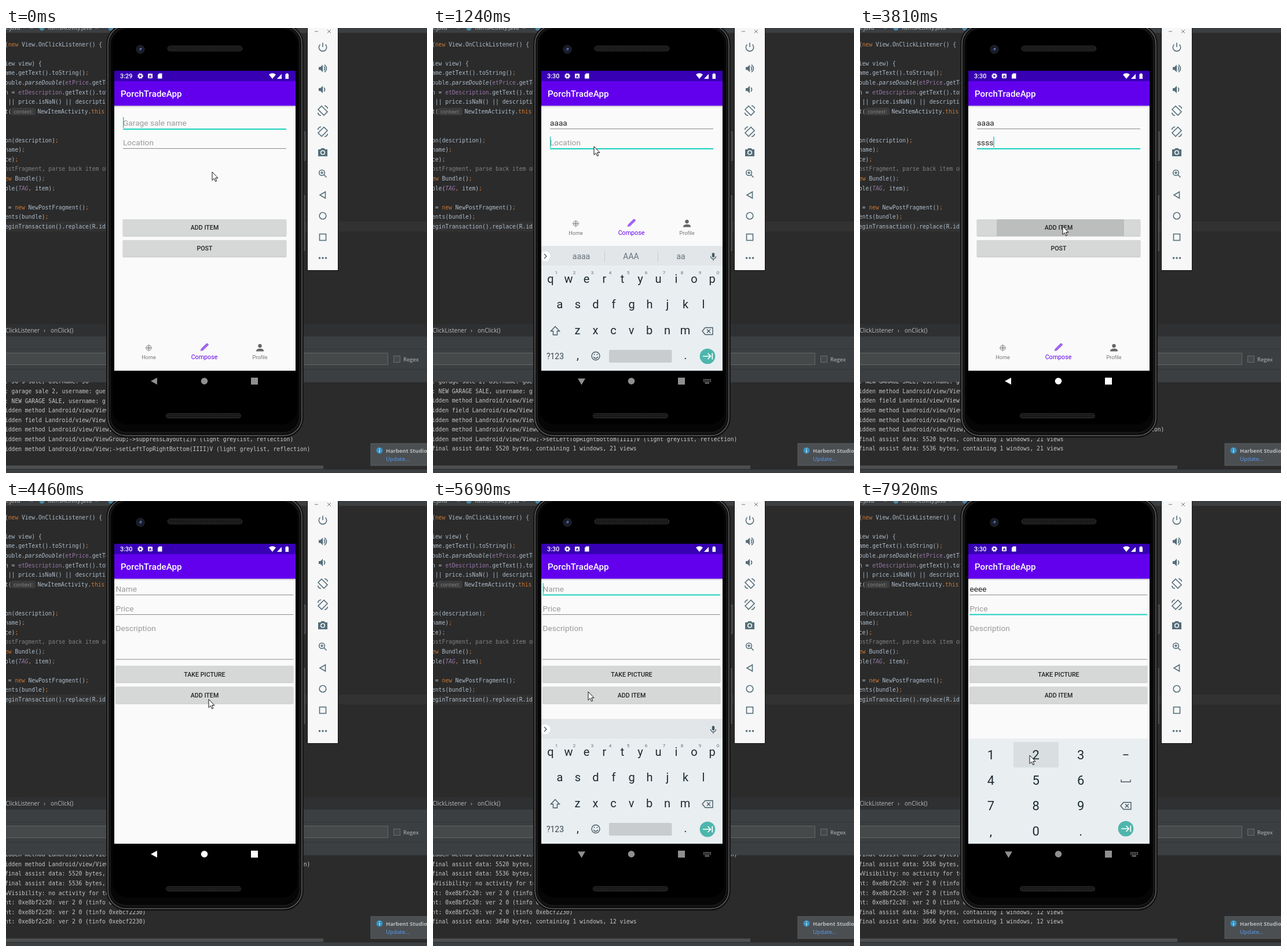
Write an HTML page that moves like this. It is 727x770 px and loops after 8000 ms.

```html
<!DOCTYPE html>
<html lang="en">
<head>
<meta charset="utf-8">
<title>Emulator demo</title>
<style>
html, body { margin: 0; width: 100%; height: 100%; overflow: hidden; background: #2b2b2b }
svg { display: block; width: 727px; height: 770px }
text { white-space: pre; font-family: Roboto, sans-serif }
.code text { font: 9.65px "DejaVu Sans Mono", monospace; fill: #adbbc9 }
.code .log { fill: #c6c6c6 }
.code .kw { fill: #cc7832 }
.code .field { fill: #9876aa }
.code .it { font-style: italic }
.code .note { fill: #808080 }
.ide text { font: 10px "Open Sans", sans-serif; fill: #bbb }
.tools { fill: none; stroke: #546e7a; stroke-width: 1.6 }
.solid { fill: #546e7a; stroke: none }
.in { font-size: 13.7px; fill: #222 }
.hint { font-size: 13.7px; fill: #999 }
.btn { font-size: 10.7px; font-weight: 500; fill: #222 }
.tab { font-size: 9.1px; fill: #757575 }
.mid { text-anchor: middle }
.key { font-size: 20px; fill: #1d2b31; text-anchor: middle }
.tip { font-size: 8px; fill: #5f6c72; text-anchor: middle }
.sug { font-size: 14px; fill: #66737a; text-anchor: middle }
.line { fill: none; stroke: #455a64; stroke-width: 1.4 }
.rule { stroke: #8a8a8a }
.teal { stroke: #1cd0c0; stroke-width: 2 }
</style>
</head>
<body>
<svg viewBox="0 0 727 770">
<defs>
  <clipPath id="logClip"><rect y="612" width="727" height="124"/></clipPath>
  <clipPath id="appClip"><rect x="187" y="74" width="313" height="519"/></clipPath>
  <clipPath id="imeClip"><rect x="187" y="74" width="313" height="556"/></clipPath>
  <linearGradient id="shade" x2="0" y2="1">
    <stop stop-opacity=".2"/><stop offset="1" stop-opacity="0"/>
  </linearGradient>
  <pattern id="mesh" width="3" height="3" patternUnits="userSpaceOnUse">
    <rect width="3" height="3" fill="#0d0d0d"/><circle cx="1.5" cy="1.5" r=".9" fill="#3a3a3a"/>
  </pattern>
</defs>

<!-- IDE -->
<g class="ide">
  <rect width="727" height="770" fill="#2b2b2b"/>
  <rect width="727" height="9" fill="#3c3f41"/>
  <rect y="8" width="727" height="1" fill="#323232"/>
  <text x="-12" y="3">ent.java</text><text x="41" y="3" fill="#888">×</text>
  <circle cx="62" cy="0" r="4.5" fill="#4a88a8"/><text x="72" y="3" style="font-size:9.5px">ItemsActivity.java</text>
  <text x="154" y="3">×</text><circle cx="181" cy="0" r="4.5" fill="#4a88a8"/>
  <rect y="335" width="727" height="17" fill="#323232"/>
  <rect y="513" width="727" height="20" fill="#2e3032"/>
  <text x="-7" y="527">nClickListener</text><text x="65" y="527">›</text><text x="77" y="527">onClick()</text>
  <rect y="533" width="727" height="80" fill="#3c3f41"/>
  <path d="M0 533.5H727M0 555.5H727M0 590.5H727" stroke="#323232"/>
  <rect x="-2" y="562.5" width="661.5" height="20" fill="#45494a" stroke="#646464"/>
  <rect x="669.5" y="567.5" width="11" height="11" fill="#43494a" stroke="#6b6b6b"/>
  <text x="686" y="577" style="font-size:9.6px">Regex</text>
  <rect y="613" width="727" height="144" fill="#2b2b2b"/>
  <rect y="757" width="548" height="6" fill="#4d4e4f"/>
  <rect y="764" width="727" height="6" fill="#3c3f41"/>
</g>
<g class="code" id="code">
  <rect x="9" y="138" width="42" height="13" rx="3" fill="#3b3b3b"/>
  <text x="13" y="147.5" style="font:9px 'Open Sans',sans-serif;fill:#888">context:</text>
</g>
<g class="code" clip-path="url(#logClip)"><g id="log"></g></g>
<g class="ide">
  <rect x="630" y="719" width="99" height="38" fill="#4b4f52" stroke="#5c6062"/>
  <circle cx="645" cy="731" r="5.5" fill="#3592c4"/>
  <path d="M645 730V734.5M645 727V728.6" stroke="#ddd" stroke-width="1.5"/>
  <text x="656" y="735" style="font-weight:700;font-size:9.4px">Harbent Studio</text>
  <text x="656" y="748.5" style="fill:#589df6;font-size:9.7px">Update...</text>
</g>

<!-- Emulator tools -->
<rect x="520.5" y="-2" width="53" height="421.5" fill="#f7f7f7" stroke="#111"/>
<g class="tools">
  <path d="M533 6H539M555 3L561 9M561 3L555 9" stroke="#777" stroke-width="1"/>
  <path d="M542.5 28.5A6.7 6.7 0 1 0 551.5 28.5M547 25.5V33"/>
  <g id="speaker">
    <path class="solid" d="M540 67.5H543L547 63.5V76.5L543 72.5H540Z"/>
    <path d="M549 66.5Q552 70 549 73.5"/>
  </g>
  <path d="M550 63.5Q557 70 550 76.5"/>
  <use href="#speaker" y="36.5"/>
  <g id="rotate">
    <path d="M545 135L555 145L549 151L539 141ZM550 134.5Q554.5 135 555.5 139.500M544 151.5Q539.500 151 538.500 146.500"/>
  </g>
  <use href="#rotate" transform="matrix(-1 0 0 1 1094 36.5)"/>
  <path class="solid" d="M539 210H543L544.5 208H549.5L551 210H555V222H539Z"/>
  <circle cx="547" cy="215.5" r="3.3" stroke="#f7f7f7"/>
  <circle cx="545.5" cy="250.5" r="4.8"/><path d="M549 254L553.5 258.5M543 250.5H548M545.5 248V253"/>
  <path d="M551.5 283.5V294.5L542 289Z"/><circle cx="547" cy="325" r="5.8"/>
  <rect x="541.5" y="356.5" width="11" height="11"/>
  <g class="solid"><circle cx="541.5" cy="398" r="1.8"/><circle cx="547" cy="398" r="1.8"/><circle cx="552.5" cy="398" r="1.8"/></g>
</g>

<!-- Phone -->
<path d="M511 180H517V229H511ZM511 290H516V385H511Z" fill="#3a3a3a" stroke="#777" stroke-width=".7"/>
<rect x="173.5" y="-6.500" width="340" height="715" rx="34" fill="#0c0c0c" stroke="#1a1a1a"/>
<rect x="176" y="-4" width="335" height="709.500" rx="31.500" fill="#101010" stroke="#626262" stroke-width="1.500"/>
<rect x="180" y="0" width="327" height="700" rx="28" fill="#060606" stroke="#262626"/>
<rect x="184" y="2" width="319" height="684" rx="26" fill="#000"/>
<rect x="279" y="31" width="129" height="9" rx="4.5" fill="url(#mesh)" stroke="#2a2a2a"/>
<rect x="276.5" y="667" width="129" height="8" rx="4" fill="url(#mesh)" stroke="#2a2a2a"/>
<circle cx="232" cy="37" r="7" fill="#161a24" stroke="#2c3038"/><circle cx="232" cy="37" r="2.6" fill="#33427a"/>
<circle cx="233" cy="35.5" r="1" fill="#a9b6e0"/>

<g clip-path="url(#appClip)">
  <rect x="187" y="74" width="313" height="519" fill="#fafafa"/>
  <!-- Sale form -->
  <text class="hint" x="202" y="168.5" data-on="0-560">Garage sale name</text>
  <text class="hint" x="202" y="203" data-on="0-1650">Location</text>
  <text class="in" x="202" y="168.5" data-type="a 560 700 840 980"></text>
  <text class="in" x="202" y="203" data-type="s 1650 1790 1920 2060"></text>
  <path class="rule" d="M202 174.5H484M202 208.5H484"/>
  <path class="teal" d="M202 175H484" data-on="0-1240"/>
  <path class="teal" d="M202 209H484" data-on="1240-8000"/>
  <g data-on="0-430 2860-5000">
    <g data-box="202 331 282"></g><g data-box="202 367 282"></g>
    <rect id="ripple" x="236" y="331" width="220" height="29" fill="#bcbdbd" data-on="3810-4330"/>
    <text class="btn mid" x="343" y="349">ADD ITEM</text><text class="btn mid" x="343" y="385">POST</text>
  </g>
  <g id="tabs">
    <circle cx="246.5" cy="553.5" r="4.3" fill="none" stroke="#9a9a9a" stroke-width="1.3"/>
    <circle cx="246.5" cy="553.5" r="2.3" fill="#9a9a9a"/>
    <path d="M246.5 547.5V559.5M240.5 553.5H252.5" stroke="#9a9a9a"/>
    <path d="M335.5 559L336.8 555L346 545.8Q347.5 544.8 349 546.2T349.3 549.2L340 558.2Z" fill="#a066f0"/>
    <circle cx="438.5" cy="550" r="3.2" fill="#666"/><path d="M432 559.5V558Q433 555 438.5 554.8T445 558V559.5Z" fill="#666"/>
    <text class="tab mid" x="246.5" y="573">Home</text>
    <text class="mid" x="342.5" y="573" font-size="10.7" fill="#6200ee">Compose</text>
    <text class="tab mid" x="438.5" y="573">Profile</text>
  </g>

  <!-- Item form -->
  <g id="itemForm">
    <rect x="187" y="120" width="313" height="500" fill="#fafafa"/>
    <text class="hint" x="189.5" y="156.5" data-on="4070-6050">Name</text>
    <text class="in" x="189.5" y="156.5" data-type="e 6050 6440 6690 6980"></text>
    <text class="hint" x="189.5" y="190.5">Price</text><text class="hint" x="189.5" y="224.5">Description</text>
    <path class="rule" d="M189 162.5H496M189 196.5H496M189 274H496"/>
    <path class="teal" d="M189 162.5H496" data-on="5130-7530"/>
    <path class="teal" d="M189 196.5H496" data-on="7530-8000"/>
    <g data-box="189 285 307"></g><g data-box="189 321.5 307"></g>
    <text class="btn mid" x="343" y="303.5">TAKE PICTURE</text><text class="btn mid" x="343" y="340">ADD ITEM</text>
  </g>
  <rect id="under" height="1" width="0" fill="#222"/>
  <rect id="caret" width="1.3" height="19" fill="#1cbfb0" data-on="0-3130 3530-4070 5130-7920"/>

  <rect x="187" y="134" width="313" height="4" fill="url(#shade)"/>
  <rect x="187" y="92" width="313" height="42.5" fill="#6200ee"/>
  <rect x="187" y="74" width="313" height="18" fill="#3700b3"/>
  <text x="198" y="119" font-size="15.2" font-weight="500" fill="#fff">PorchTradeApp</text>
  <g fill="#fff">
    <g font-size="10.9" font-weight="500"><text x="197" y="87" data-on="0-560">3:29</text><text x="197" y="87" data-on="560-8000">3:30</text></g>
    <circle cx="232" cy="83" r="2.8" fill="none" stroke="#fff" stroke-width="2"/>
    <circle cx="232" cy="83" r="4.2" fill="none" stroke="#fff" stroke-width="1.4" stroke-dasharray="1.9 1.4"/>
    <rect x="245" y="79" width="8" height="8" rx="1"/><text class="mid" x="249" y="86" font-size="7.5" font-weight="700" fill="#3700b3">A</text>
    <path d="M262 81L264.5 78.5H269.5V87.5H262Z"/>
    <path d="M454 80.5Q460 76 466 80.5L460 88ZM468 88L476 79.5V88ZM482.5 79.5H484V78.5H486.5V79.5H488V88H482.5Z"/>
  </g>
</g>

<!-- Keyboards -->
<g clip-path="url(#imeClip)">
  <g id="ime" data-on="290-2860 5260-7660">
    <rect x="187" y="377" width="313" height="216" fill="#e9eef1"/>
    <rect x="187" y="377" width="313" height="34" fill="#e2e6e9"/>
    <circle cx="194" cy="395" r="8.5" fill="#fff"/><path class="line" d="M192 391L196 395L192 399"/>
    <rect x="481.8" y="389" width="4.4" height="8" rx="2.2" fill="#455a64"/>
    <path class="line" d="M479.5 395Q480 399.5 484 399.5T488.5 395M484 399.5V402.5"/>
    <g id="keys"></g>
    <path class="line" d="M211 516.5L203.5 524.5H207.5V531H214.5V524.5H218.5Z"/>
    <path id="del" class="line" d="M465 524.5L470 518.5H483V530.5H470ZM473 521.5L479 527.5M479 521.5L473 527.5"/>
    <text class="mid" x="211" y="573" font-size="14" fill="#37474f">?123</text>
    <text class="key" x="250" y="573">,</text><text class="key" x="436" y="573">.</text>
    <circle class="line" cx="281" cy="567.5" r="7"/><path class="line" d="M277 569Q281 574 285 569M278.5 564V566M283.5 564V566"/>
    <rect x="304" y="557" width="108.5" height="22" rx="2" fill="#c8cccf"/>
    <circle cx="474" cy="568" r="13.3" fill="#4db6ac"/>
    <circle cx="474" cy="568" r="13.3" fill="#3a948b" data-on="7410-7530"/>
    <path id="next" d="M466 568H479M474.5 563L479.5 568L474.5 573M482.3 562.5V573.5" fill="none" stroke="#fff" stroke-width="1.7"/>
  </g>
  <g id="pad" data-on="7660-8000">
    <rect x="187" y="411" width="313" height="182" fill="#e9eef1"/>
    <rect x="265" y="417" width="78" height="44" fill="#d9dee0" data-on="7920-8000"/>
    <path class="line" d="M451 482V486H467V482"/><use href="#del" x="-15" y="3"/>
    <circle cx="459" cy="567" r="13.3" fill="#4db6ac"/><use href="#next" x="-15" y="-1"/>
  </g>
</g>

<!-- System navigation -->
<rect x="224" y="594" width="64" height="36" rx="18" fill="#2c2c2c" data-on="2460-2860"/>
<g id="sysNav">
  <path d="M250 611L261 605V617Z" data-on="0-290 2860-5400"/>
  <path d="M250 606.5H263L256.5 617.5Z" data-on="290-2860 5400-8000"/>
  <circle cx="342.5" cy="611" r="5.8"/><rect x="423" y="605" width="12" height="12"/>
  <g data-on="290-2860 5400-8000" fill="none" stroke="#8a8a8a" stroke-width="1.8">
    <path d="M467 608.5H480M467 611.3H480" stroke-dasharray="1.7 1.1"/><path d="M469.5 614.3H477"/>
  </g>
</g>
<g id="mouse"><path d="M0 0V14.5L3.3 11.4L5.6 16.6L7.8 15.7L5.6 10.6H10Z" fill="#fff" stroke="#111" stroke-linejoin="round"/></g>
</svg>

<script>
const LOOP = 8000, STEP = 16.6;
const $ = id => document.getElementById(id);
const all = (sel, fn) => document.querySelectorAll(sel).forEach(fn);
const text = (cls, x, y, s, attrs = '') => `<text class="${cls}" x="${x}" y="${y}" ${attrs}>${s}</text>`;
const add = (id, html) => $(id).insertAdjacentHTML('beforeend', html);

// Editor: [row, code], rows counted from the first visible line
const paint = s => s
  .replace(/[;,]|\b(new|ew|this)\b/g, '<tspan class="kw">$&</tspan>')
  .replace(/etPrice|etDescription/g, '<tspan class="field">$&</tspan>')
  .replace(/TAG/, '<tspan class="field it">$&</tspan>')
  .replace(/parseDouble/, '<tspan class="it">$&</tspan>');
[[0, '(new View.OnClickListener() {'], [2, 'iew view) {'], [3, 'ame.getText().toString();'],
 [4, 'ouble.parseDouble(etPrice.getTe'], [5, 'n = etDescription.getText().toS'],
 [6, ' || price.isNaN() || descripti'], [7, 't('], [10, 'on(description);'], [11, 'name);'], [12, 'ce);'],
 [14, 'ew Bundle();'], [15, 'ble(TAG, item);'], [17, ' = new NewPostFragment();'],
 [18, 'ents(bundle);'], [19, 'eginTransaction().replace(R.id.']
].forEach(([row, s]) => add('code', text('', -2, 31.6 + row * STEP, paint(s))));
add('code', text('', 54.5, 31.6 + 7 * STEP, paint('NewItemActivity.this')));
add('code', text('note', -2, 31.6 + 13 * STEP, 'ostFragment, parse back item ob'));

// Log
const hidden = (kind, s) => `idden ${kind} Landroid/view/View${s} (light greylist, reflection)`;
const assist = (bytes, views) => `final assist data: ${bytes} bytes, containing 1 windows, ${views} views`;
const tinfo = 'nt: 0xe8bf2c20: ver 2 0 (tinfo 0xebcf2230)';
[': Jo\'s sale, username: Jo', ': garage sale 2, username: gue', ': NEW GARAGE SALE, username: g',
 hidden('method', ';->getInset()V'), hidden('field', ';->mInfo:I'), hidden('method', ';->fitAll()Z'),
 hidden('method', 'Group;->suppressLayout(Z)V'), hidden('method', ';->setLeftTopRightBottom(IIII)V'),
 assist(5520, 21), assist(5536, 21), 'wVisibility: no activity for token', tinfo, tinfo, tinfo,
 assist(3640, 12), assist(3656, 12)
].forEach((s, i) => add('log', text('log', -2, 615.3 + i * STEP, s)));

// Keyboard
const suggest = (words, on) => words.forEach((w, i) => add('keys', text('sug', 256 + i * 86, 400, w, `data-on="${on}"`)));
suggest(['aaaa', 'AAA', 'aa'], '560-1390');
suggest(['ssss', 'SSS', 'as'], '1650-2460');
suggest(['ee', 'we', 'well'], '6050-7530');
add('keys', '<path d="M296.5 387V404M388.5 387V404" stroke="#c3cacd" data-on="560-1390 1650-2460 6050-7530"/>');
[['qwertyuiop', 203, 441], ['asdfghjkl', 219, 485], ['zxcvbnm', 249.5, 530]].forEach(([row, x, y]) =>
  [...row].forEach((c, i) => add('keys', text('key', x + i * 31, y, c))));
[...'1234567890'].forEach((c, i) => add('keys', text('tip', 213 + i * 31, 426, c)));
const popup = (c, x, y, on) => add('keys', `<g data-on="${on}" transform="translate(${x} ${y})">
  <rect x="-16.5" y="-78" width="33" height="89" rx="4" fill="#d4d8da" stroke="#c2c7c9" stroke-width=".8"/>
  ${text('key', 0, -49, c)}${text('tip', 9, -39, '…')}</g>`);
popup('a', 219, 485, '560-700 840-1120');
popup('s', 250, 485, '1650-1790 1920-2200');
popup('e', 265.5, 441, '6050-6170 6440-6570 6690-6840 6980-7120');
['123−', '456', '789', ',0.'].forEach((row, r) =>
  [...row].forEach((c, i) => add('pad', text('key', 226 + i * 77.6, 447 + r * 44, c, 'style="font-size:22px"'))));

all('[data-box]', el => {
  const [x, y, w] = el.dataset.box.split(' ').map(Number);
  el.innerHTML = `<rect x="${x - .5}" y="${y}" width="${w + 1}" height="30" rx="2" fill="#ccc"/>
    <rect x="${x}" y="${y}" width="${w}" height="28.8" rx="1.5" fill="#d6d7d7"/>`;
});
all('[data-type]', el => {
  const [c, ...times] = el.dataset.type.split(' ');
  el.innerHTML = times.map(t => `<tspan data-on="${t}-${LOOP}">${c}</tspan>`).join('');
});

// Timelines: [ms, value] pairs become stepped CSS keyframes
const sheet = document.head.appendChild(document.createElement('style'));
let rules = '', count = 0;
function track(el, prop, steps) {
  const name = 'k' + count++;
  const frames = [...steps, [LOOP, steps.at(-1)[1]]].map(([t, v]) => `${t / LOOP * 100}%{${prop}:${v}}`);
  rules += `@keyframes ${name}{${frames.join('')}}`;
  el.style.animation = [el.style.animation, `${name} ${LOOP}ms step-end infinite`].filter(Boolean).join(',');
}
const move = (id, steps) => track($(id), 'transform', steps.map(([t, x, y]) => [t, `translate(${x}px,${y}px)`]));

all('[data-on]', el => {
  const at = new Map([[0, 'hidden']]);
  el.dataset.on.split(' ').forEach(span => {
    const [a, b] = span.split('-').map(Number);
    at.set(a, 'visible');
    if (b < LOOP) at.set(b, 'hidden');
  });
  track(el, 'visibility', [...at]);
});

move('mouse', [[0, 356, 249], [150, 306, 172], [290, 262, 164], [430, 238, 320], [560, 222, 474],
  [1120, 258, 300], [1240, 278, 205], [1510, 262, 370], [1650, 252, 474], [2200, 270, 490],
  [2340, 292, 518], [2460, 305, 527], [2860, 322, 450], [3000, 342, 375], [3130, 350, 343],
  [4590, 325, 285], [4720, 286, 212], [4850, 256, 168], [5000, 246, 153], [5530, 252, 220],
  [5660, 268, 330], [5800, 288, 420], [5930, 297, 447], [6050, 260, 438], [7120, 370, 500],
  [7270, 446, 552], [7410, 474, 565], [7660, 420, 530], [7790, 345, 470], [7920, 293, 440]]);
move('log', [[0, 0], [430, 1], [1390, 2], [4200, 3], [4330, 6], [5400, 7], [7660, 8]].map(([t, n]) => [t, 0, -n * STEP]));
move('tabs', [[0, 0, 0], [430, 0, -215], [2860, 0, 0]]);
move('ime', [[0, 0, 216], [290, 0, 110], [430, 0, 0], [2580, 0, 4], [2710, 0, 48], [5260, 0, 110], [5400, 0, 0]]);
track($('ime'), 'opacity', [[0, 1], [290, .7], [430, 1], [2710, .4], [5260, .7], [5400, 1]]);
move('itemForm', [[0, 0, 40], [4070, 0, 24], [4200, 0, 6], [4330, 0, 0]]);
track($('itemForm'), 'opacity', [[0, 0], [4070, .4], [4200, .9], [4330, 1]]);
track($('ripple'), 'x', [[0, '236px'], [3940, '202px']]);
track($('ripple'), 'width', [[0, '220px'], [3940, '282px']]);
track($('sysNav'), 'fill', [[0, '#8f8f8f'], [2860, '#fff'], [5400, '#8f8f8f']]);

// Caret and composing underline follow the typed letters
const carets = [], widths = [[0, '0px']], spots = [[0, 0, 0]];
[[0, 202, 154, 7.45, [560, 700, 840, 980], 1240], [1240, 202, 188, 7.07, [1650, 1790, 1920, 2060], 2460],
 [5130, 189.5, 142, 7.26, [6050, 6440, 6690, 6980], 7530]].forEach(([start, x, y, w, times, end]) => {
  carets.push([start, x, y]);
  times.forEach((t, i) => {
    carets.push([t, x + w * (i + 1), y]);
    widths.push([t, w * (i + 1) + 'px']);
  });
  spots.push([times[0], x, y + 16]);
  widths.push([end, '0px']);
});
carets.push([7530, 189.5, 176]);
move('caret', carets);
move('under', spots);
track($('under'), 'width', widths);
sheet.textContent = rules;
</script>
</body>
</html>
```
